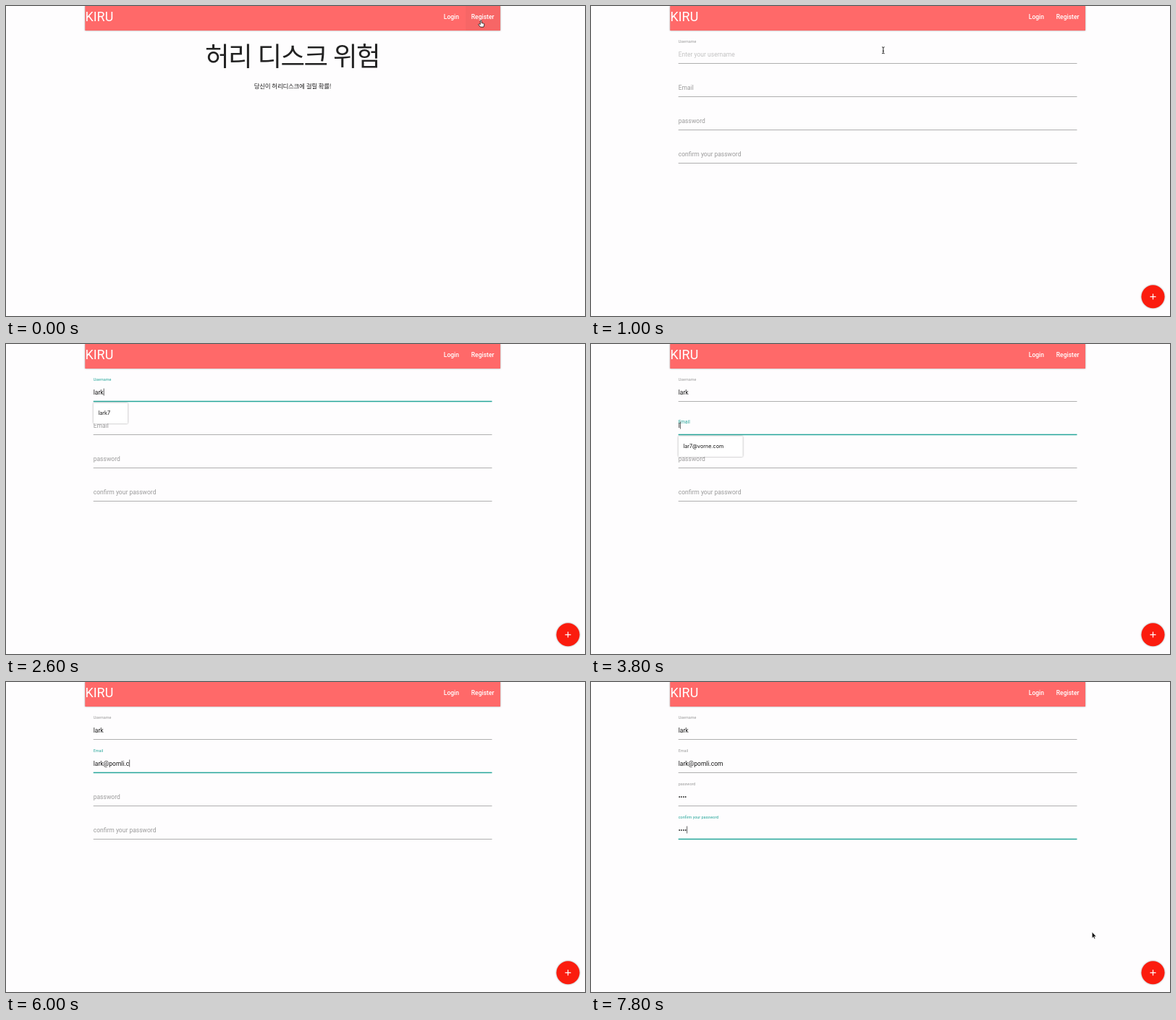
These frames come from a looping animation (800x429 px, 8 s). An HTML page:

```html
<!DOCTYPE html>
<html lang="ko">
<head>
<meta charset="utf-8">
<title>Register form</title>
<style>
  html, body { margin: 0; width: 100%; height: 100%; overflow: hidden; background: #fefdfe; }
  svg { display: block; width: 800px; height: 429px; }
  text { font: 8.53px Roboto, sans-serif; white-space: pre; }
  .brand { font-size: 17.92px; fill: #fff; }
  .link { font-weight: 500; fill: #fff; }
  .korean { font-family: "Noto Sans CJK KR", "Noto Sans CJK", sans-serif; fill: #222; text-anchor: middle; }
  .headline { font-size: 36.5px; letter-spacing: -1.6px; }
  .sub { font-size: 8.53px; letter-spacing: -.3px; }
  .option { font: 7.2px Inter, sans-serif; fill: #111; }
  .status { font: 6.4px Inter, sans-serif; fill: #444; text-anchor: end; }
  .card { filter: drop-shadow(0 .8px 1px rgba(0,0,0,.4)); }
</style>
</head>
<body>
<svg id="stage" viewBox="0 0 800 429"></svg>
<script>
const LOOP = 8000, STEP = 200;
const LEFT = 120.7, RIGHT = 671.5, ROW = 46;
const TEAL = '#26a69a', GREY = '#9b9b9b';
const stage = document.getElementById('stage');

// keys: [time, number of characters typed by then]
const fields = [
  { label: 'Username', value: 'lark', hint: 'Enter your username', focus: 1600, blur: 3000, lift: 0, caretFrom: 2000,
    keys: [[2200, 1], [2400, 2], [2600, 4]] },
  { label: 'Email', value: 'lark@pomli.com', focus: 3000, blur: 6400, lift: 3800, caretFrom: 3200,
    keys: [[3800, 1], [4000, 2], [4200, 3], [4400, 4], [4800, 5], [5000, 6], [5200, 8],
           [5400, 9], [5600, 11], [6000, 12], [6200, 14]] },
  { label: 'password', value: '••••', focus: 6400, blur: 7200, lift: 6400, caretFrom: 6400,
    keys: [[6800, 2], [7000, 4]] },
  { label: 'confirm your password', value: '••••', focus: 7200, blur: LOOP, lift: 7200, caretFrom: 7200,
    keys: [[7400, 1], [7600, 3], [7800, 4]] }
];

const popups = [
  { from: 1800, to: 2200, row: 0, width: 109,
    items: ['kiru', 'pelmarin', 'kkt20724@vorne.com', 'tarok@ulvem.edu', 'tarok', 'kkt20724@pomli.com'] },
  { from: 2200, to: 3000, row: 0, width: 47.5, items: ['lark7'] },
  { from: 3400, to: 3800, row: 1, width: 109,
    items: ['lar7@vorne.com', 'kkt20724@vorne.com', 'tarok@ulvem.edu'] },
  { from: 3800, to: 4400, row: 1, width: 89, items: ['lar7@vorne.com'] }
];

const within = (t, from, to) => t >= from && t < to;
const mix = (a, b, p) => a + (b - a) * p;
const text = (x, y, body, attrs = '') => `<text x="${x}" y="${y}" ${attrs}>${body}</text>`;
const rect = (x, y, w, h, attrs) => `<rect x="${x}" y="${y}" width="${w}" height="${h}" ${attrs}/>`;

function navbar(t) {
  const hover = t < 200 ? .03 : t < 800 ? .065 : 0;
  return `<g class="card">${rect(109.3, 0, 573.7, 34, 'fill="#ff6969"')}</g>` +
    rect(635, 0, 48, 34, `opacity="${hover}"`) +
    text(109.5, 21, 'KIRU', 'class="brand"') +
    text(604.8, 18.2, 'Login', 'class="link"') +
    text(642.8, 18.2, 'Register', 'class="link"');
}

const home = () =>
  text(395.5, 83, '허리 디스크 위험', 'class="korean headline"') +
  text(396, 114.2, '당신이 허리디스크에 걸릴 확률!', 'class="korean sub"');

function field(f, row, t) {
  const y = row * ROW;
  const focused = within(t, f.focus, f.blur);
  const count = f.keys.reduce((n, [at, chars]) => t >= at ? chars : n, 0);
  const rise = t < f.lift ? 0 : f.lift && t < f.lift + STEP ? .31 : 1;
  const size = mix(8.53, 5.46, rise ** .35);
  const caret = focused && t >= f.caretFrom;
  let out = rect(LEFT, y + (focused ? 78.7 : 79), RIGHT - LEFT, focused ? 1.5 : .9,
    `fill="${focused ? TEAL : '#a6a6a6'}"`);
  out += text(LEFT, y + mix(69.5, 51, rise), f.label,
    `style="font-size:${size}px" fill="${focused ? TEAL : GREY}"`);
  if (f.hint && !count) out += text(LEFT, 69.5, f.hint, 'fill="#c2c2c2"');
  return out + text(LEFT, y + 69.5, f.value.slice(0, count), `fill="#161616" ${caret ? 'id="typing"' : ''}`);
}

function popup({ row, width, items }) {
  const y = row * ROW;
  const height = 8 + 20.5 * items.length;
  return `<g class="card">${rect(120.7, y + 81.5, width, height, 'rx="1.2" fill="#fff"')}</g>` +
    items.map((item, i) => text(127.5, y + 97.8 + i * 20.5, item, 'class="option"')).join('');
}

const fab = () =>
  `<g class="card"><circle cx="776.5" cy="402.3" r="16" fill="#fb1c0e"/></g>
   <path d="M772.5 402.3h8m-4-4v8" stroke="#fff" stroke-width="1.2"/>`;

const statusBar = () =>
  `<g class="card">${rect(-4, 420, 262.5, 14, 'rx="1.5" fill="#f5f4f5" stroke="#c6c6c6" stroke-width=".5"')}</g>` +
  text(63, 427.5, 'localhost:3000/register', 'class="status"');

const shapes = {
  hand: '<path d="M-1.2 6V.8Q-.3-.5.6.8V4L3.5 4.6Q4.6 5 4.3 6.5L3.5 9.6H-1L-3.8 6.2Q-3.4 4.8-2.2 5.6Z" fill="#fff" stroke="#111" stroke-width=".8"/>',
  beam: '<path d="M-1.8-4.5Q0-4.5 0-3.5Q0-4.5 1.8-4.5M0-3.5V3.5M-1.8 4.5Q0 4.5 0 3.5Q0 4.5 1.8 4.5M-1 1H1" fill="none" stroke="#111" stroke-width=".9"/>',
  arrow: '<path d="M0 0V8.4L1.9 6.7 3.2 9.6 4.5 9 3.2 6.2H5.8Z" fill="#111" stroke="#fff" stroke-width=".5"/>'
};

function pointer(t) {
  const place = (shape, x, y) => `<g transform="translate(${x} ${y})">${shapes[shape]}</g>`;
  if (t >= 7800) return place('arrow', 692.3, 346);
  if (t >= 2000) return '';
  const p = Math.min(1, Math.max(0, (t - 400) / 800));
  const eased = p * p * (3 - 2 * p);
  const x = mix(656.5, 357, eased), y = mix(19.5, 69, eased);
  return place(x > 635 && y < 34 ? 'hand' : y > 55 ? 'beam' : 'arrow', x, y);
}

function draw(t) {
  let scene = navbar(t);
  if (t < 400) scene += home();
  else scene += fields.map((f, row) => field(f, row, t)).join('') + fab();
  scene += popups.filter(p => within(t, p.from, p.to)).map(popup).join('');
  if (within(t, 200, 1000)) scene += statusBar();
  stage.innerHTML = scene + pointer(t);

  const typing = document.getElementById('typing');
  if (typing) {
    const x = LEFT + typing.getComputedTextLength() + .2;
    const y = +typing.getAttribute('y') - 8;
    typing.insertAdjacentHTML('afterend', rect(x, y, .7, 10, 'fill="#222"'));
  }
}

let shown = -1;
const start = performance.now();
function tick() {
  const elapsed = (performance.now() - start) % LOOP;
  const t = Math.floor(elapsed / STEP) * STEP;
  if (t !== shown) draw(shown = t);
  requestAnimationFrame(tick);
}
tick();
</script>
</body>
</html>
```
